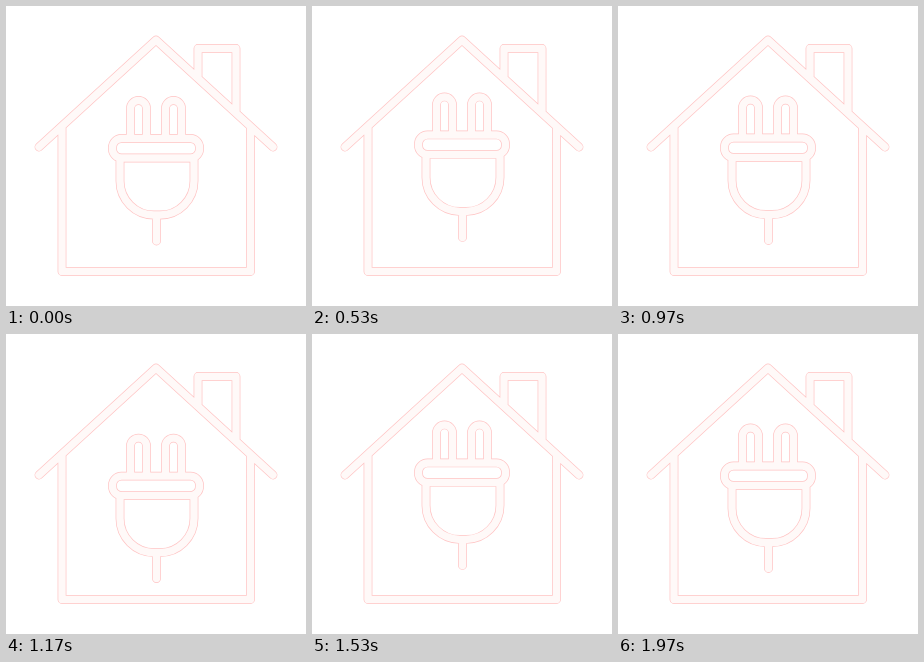
An HTML page with a canvas for the animation above (2010 ms loop, 300 by 300 pixels).

```html
<!DOCTYPE html>
<html lang="en">
<head>
<meta charset="utf-8">
<title>Home power</title>
<style>
html, body { margin: 0; width: 100%; height: 100%; overflow: hidden; background: #fff; }
canvas { display: block; width: 300px; height: 300px; }
</style>
</head>
<body>
<canvas id="stage" width="300" height="300"></canvas>
<script>
const ctx = document.getElementById('stage').getContext('2d');
const LOOP = 2010, STEPS = 60, CYCLE = 30;
const EDGE = '#ffc3c3', FILL = '#fff9f8';

const house = new Path2D(
  'M33 141 L150 34 L267 141' +
  'M56 121 V265.5 H244.5 V121' +
  'M192 71 V42.5 H230 V106');

const plug = new Path2D(
  'M124.5 132 V102.5 a8 8 0 0 1 16 0 V132' +
  'M159.5 132 V102.5 a8 8 0 0 1 16 0 V132' +
  'M114 152 V175 a34 34 0 0 0 34 34 h6 a34 34 0 0 0 34 -34 V152' +
  'M150.5 209 V235');
plug.roundRect(106.5, 132.5, 87, 19.5, 9);

// Plug height within a cycle: [step, offset]
const keys = [[0, 0], [7, 12], [22, -12], [CYCLE, 0]];

function offset(step) {
  const i = keys.findIndex(k => k[0] > step);
  const [s0, y0] = keys[i - 1], [s1, y1] = keys[i];
  const u = (step - s0) / (s1 - s0);
  return y0 + (y1 - y0) * u * u * (3 - 2 * u);
}

function outline(path) {
  for (const [color, width] of [[EDGE, 8.8], [FILL, 7.4]]) {
    ctx.strokeStyle = color;
    ctx.lineWidth = width;
    ctx.stroke(path);
  }
}

function draw(now) {
  const t = now % LOOP;
  const step = Math.min(STEPS - 1, Math.floor(t / 33.36 + 0.2));
  ctx.fillStyle = '#fff';
  ctx.fillRect(0, 0, 300, 300);
  ctx.lineCap = ctx.lineJoin = 'round';
  outline(house);
  ctx.save();
  ctx.translate(0, offset(step % CYCLE));
  outline(plug);
  ctx.restore();
}

const start = performance.now();
function tick() {
  draw(performance.now() - start);
  requestAnimationFrame(tick);
}
tick();
</script>
</body>
</html>
```
